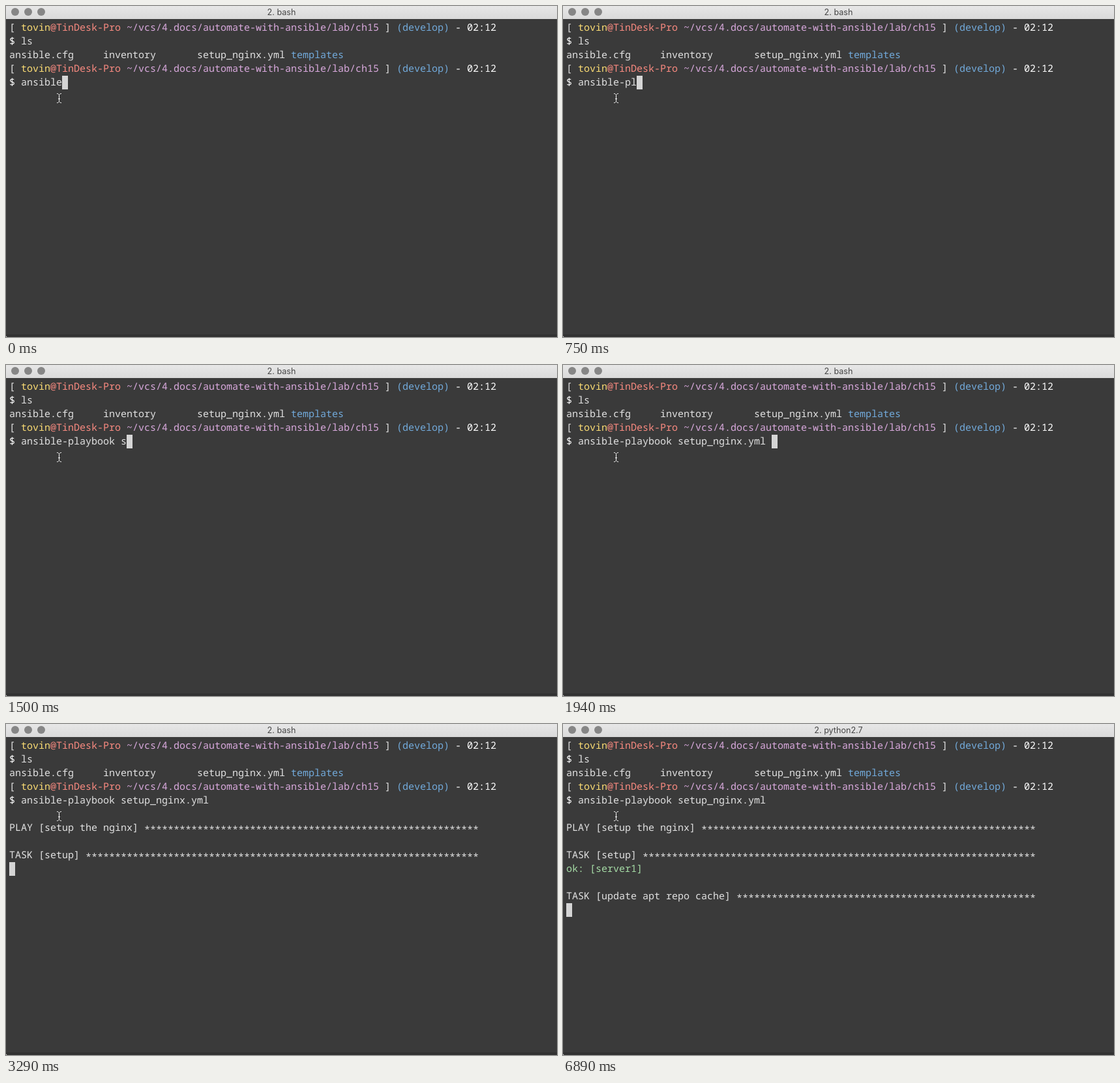
An HTML page for the animation above (8000 ms loop, 845 by 508 pixels).

```html
<!DOCTYPE html>
<html lang="en">
<head>
<meta charset="utf-8">
<title>Terminal</title>
<style>
html, body { margin: 0; width: 100%; height: 100%; overflow: hidden; background: #fff; }
#stage {
  position: relative; width: 845px; height: 508px; overflow: hidden;
  background: #3a3a3a; border-bottom-left-radius: 3px;
}
#bar {
  position: absolute; inset: 0 0 auto; height: 20px;
  background: linear-gradient(#e7e7e7, #dadada);
}
#bar i {
  position: absolute; top: 3px; width: 12px; height: 12px;
  border-radius: 50%; background: #868686;
}
#title {
  position: absolute; inset: 0 0 auto; text-align: center;
  font: 12.6px/19px Inter, "Open Sans", sans-serif; color: #464646;
}
#screen {
  position: absolute; left: 5px; top: 23px;
  font: 15px/21px "Noto Sans Mono", "DejaVu Sans Mono", monospace;
  text-rendering: geometricPrecision; font-variant-ligatures: none;
  color: #e2e2e2;
}
#screen div { height: 21px; white-space: pre; }
.user { color: #fbdc74; }
.host { color: #f98a80; }
.path { color: #d9a9dd; }
.blue { color: #72aadb; }
.ok { color: #a6dca6; }
.white { color: #fff; font-weight: 500; }
.stars { position: relative; top: 3px; }
#cursor { position: absolute; width: 9px; height: 21px; background: #d5d5d5; }
#pointer { position: absolute; left: 76px; top: 133px; }
#edge { position: absolute; inset: auto 0 0; height: 4px; background: #323232; }
</style>
</head>
<body>
<div id="stage">
  <div id="bar">
    <i style="left:8px"></i><i style="left:28px"></i><i style="left:48px"></i>
    <div id="title"></div>
  </div>
  <div id="screen"></div>
  <div id="cursor"></div>
  <svg id="pointer" width="11" height="17" fill="none" stroke="#f2f2f2">
    <path d="M2 1.5H3.5L5.5 3.5L7.5 1.5H9M5.5 3.5V13.5M2 15.5H3.5L5.5 13.5L7.5 15.5H9M4 9.5H7"/>
  </svg>
  <div id="edge"></div>
</div>
<script>
const LOOP = 8000, COLUMN = 9, ROW = 21, LEFT = 5, TOP = 23;
const byId = id => document.getElementById(id);
const span = (style, text) => `<span class="${style}">${text}</span>`;
const banner = text => text + ' ' + span('stars', '*'.repeat(79 - text.length));

const prompt = '[ ' + span('user', 'tovin') + span('host', '@TinDesk-Pro') + ' ' +
  span('path', '~/vcs/4.docs/automate-with-ansible/lab/ch15') + ' ] ' +
  span('blue', '(develop)') + span('white', ' - 02:12');
const dollar = span('white', '$') + ' ';
const command = 'ansible-playbook setup_nginx.yml ';
const listing = 'ansible.cfg'.padEnd(16) + 'inventory'.padEnd(16) +
  'setup_nginx.yml ' + span('blue', 'templates');

const head = [prompt, dollar + 'ls', listing, prompt];
const play = ['', banner('PLAY [setup the nginx]'), '', banner('TASK [setup]')];
const update = [span('ok', 'ok: [server1]'), '', banner('TASK [update apt repo cache]')];

// [time, typed characters]
const typing = [[0, 7], [300, 8], [600, 9], [750, 10], [1050, 17], [1500, 18], [1940, 33]];
const ENTER = 2840, PLAY = 3290, RENAME = 3740, UPDATE = 6890;

let shown = '';
function draw(time) {
  const typed = typing.findLast(([start]) => time >= start)[1];
  const rows = [...head, dollar + command.slice(0, typed)];
  if (time >= PLAY) rows.push(...play);
  if (time >= UPDATE) rows.push(...update);

  const entered = time >= ENTER;
  const cursorRow = entered ? rows.length : rows.length - 1;
  const cursorColumn = entered ? 0 : typed + 2;
  byId('cursor').style.left = LEFT + COLUMN * cursorColumn + 'px';
  byId('cursor').style.top = TOP + ROW * cursorRow + 'px';
  byId('title').textContent = time >= RENAME ? '2. python2.7' : '2. bash';

  const html = rows.map(row => `<div>${row}</div>`).join('');
  if (html !== shown) byId('screen').innerHTML = shown = html;
}

const start = performance.now();
function tick() {
  draw((performance.now() - start) % LOOP);
  requestAnimationFrame(tick);
}
tick();
</script>
</body>
</html>
```
